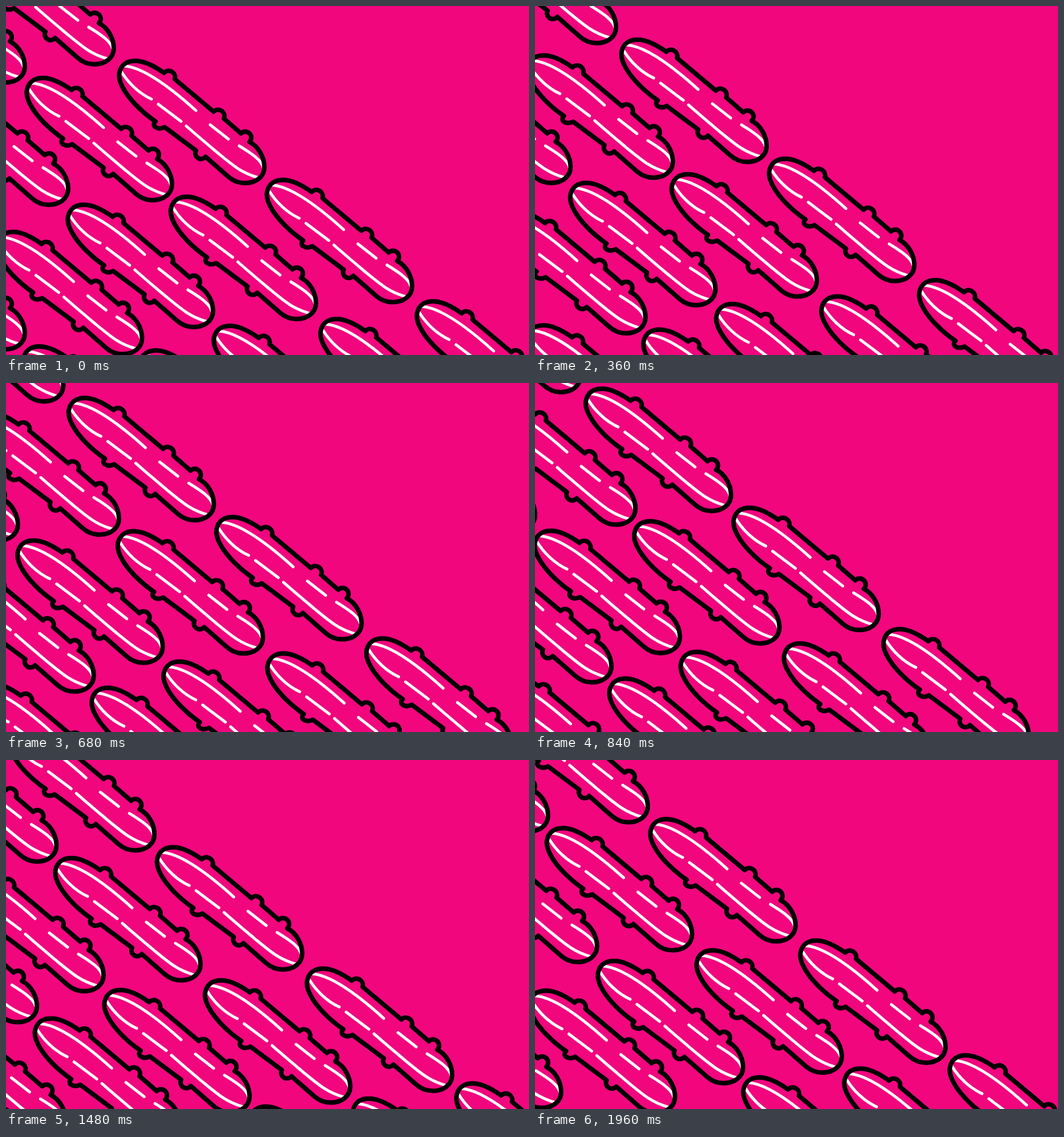
An HTML page that plays this animation: 917x611 px, repeating every 2000 ms.

```html
<!DOCTYPE html>
<html lang="en">
<head>
<meta charset="utf-8">
<title>Pickles</title>
<style>
  html, body { margin: 0; width: 100%; height: 100%; overflow: hidden; background: #f1067e; }
  svg { display: block; width: 100%; height: 100%; }
  path { fill: none; stroke-linecap: round; stroke-linejoin: round; }
  .shine { stroke: #fff; stroke-width: 5; }
  .skin { stroke: #000; stroke-width: 8; }
</style>
</head>
<body>
<svg id="stage" viewBox="0 0 917 611">
  <defs>
    <g id="pickle">
      <path class="shine" d="M207 105C241 107 292 146 333 183M203 116C214 134 233 153 255 163
        M267 172L307 202M316 210C334 226 352 241 371 257C399 280 413 292 441 300
        M358 208L390 233M409 245C432 259 448 270 451 283"/>
      <path class="skin" d="M262 202C237 185 216 163 206 145C199 133 197 124 199 116
        C202 102 213 96 227 96C243 96 260 105 277 117
        A11.3 11.3 0 0 1 296 128L364 185
        A11 11 0 0 1 382 197L412 223
        A10.5 10.5 0 0 1 427 238
        C443 246 453 265 453 282C453 299 438 310 419 310C407 310 398 306 390 299L350 264
        A10.2 10.2 0 0 1 333 253L278 212
        C266 218 254 210 262 202Z"/>
    </g>
  </defs>
</svg>
<script>
const LOOP = 2000, STEP = 40;

// Each diagonal row drifts up-left at its own speed (px per second).
const rows = [
  { v: [-130.2, -102.5], at: [[-264, -208], [0, 0], [259, 208.5], [522, 421], [784, 622]] },
  { v: [-136.8, -109.6], at: [[-420, -176], [-162, 30], [90.5, 238], [353, 452], [612, 659]] },
  { v: [-129.7, -106.2], at: [[-344, 38], [-90, 252], [166, 464], [421, 668]] },
  { v: [-124.5, -101.7], at: [[-214.5, 299.5], [36.5, 507]] },
  { v: [-122, -102.5], at: [[-420, 291], [-168, 500]] }
];

const stage = document.getElementById('stage');
const add = (parent, tag) =>
  parent.appendChild(document.createElementNS('http://www.w3.org/2000/svg', tag));
const move = (el, x, y) => el.setAttribute('transform', `translate(${x} ${y})`);

for (const row of rows) {
  row.el = add(stage, 'g');
  for (const [x, y] of row.at) {
    const use = add(row.el, 'use');
    use.setAttribute('href', '#pickle');
    move(use, x, y);
  }
}

function draw(now) {
  const t = Math.floor((now % LOOP) / STEP) * STEP / 1000;
  for (const { el, v } of rows) move(el, v[0] * t, v[1] * t);
  requestAnimationFrame(draw);
}
draw(performance.now());
</script>
</body>
</html>
```
